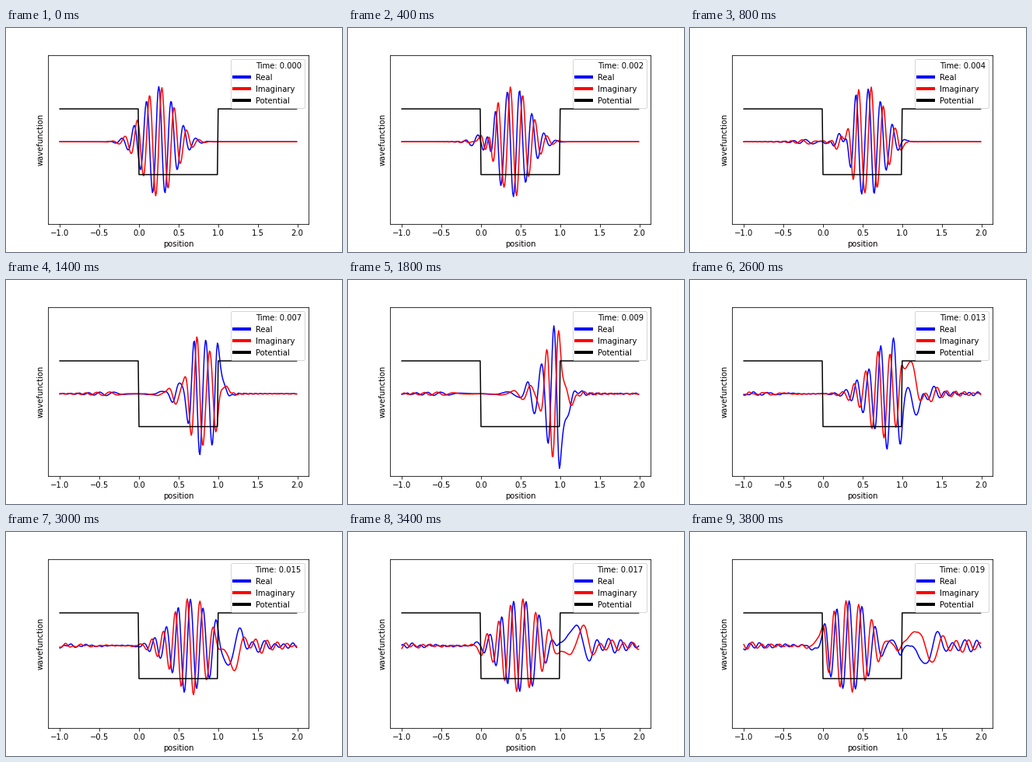
These frames come from a looping animation (432x288 px, 4 s). A matplotlib script:

```python
import numpy as np
import matplotlib.pyplot as plt
from matplotlib.animation import FuncAnimation
from matplotlib.lines import Line2D

FRAMES, INTERVAL = 20, 200
DX, DT, SUBSTEPS = 0.01, 0.001, 100
K0, X0, SIGMA = 40, 0.25, 0.2
WALL = 2000

x = np.round(np.arange(300) * DX - 1, 6)
k = 2 * np.pi * np.fft.fftfreq(x.size, DX)


def evolve():
    """Split-step solution of i psi_t = -psi_xx + V psi, one state per DT."""
    v = WALL * (np.heaviside(-x, 0.5) + np.heaviside(x - 1, 0.5))
    tau = DT / SUBSTEPS
    half_kick = np.exp(-0.5j * v * tau)
    drift = np.exp(-1j * k**2 * tau)

    psi = np.exp(-(x - X0)**2 / (2 * SIGMA**2) + 1j * K0 * (x - X0))
    psi /= np.sqrt(np.sum(np.abs(psi)**2) * DX)
    states = [psi]
    for _ in range(FRAMES - 1):
        for _ in range(SUBSTEPS):
            psi = half_kick * np.fft.ifft(drift * np.fft.fft(half_kick * psi))
        states.append(psi)
    return states


states = evolve()
well = np.where((x >= 0) & (x < 1), -1, 1)

plt.rcParams.update({"font.family": "DejaVu Sans", "font.size": 10})
fig, ax = plt.subplots(figsize=(6, 4), dpi=72)
fig.subplots_adjust(left=0.125, right=0.9, bottom=0.125, top=0.88)

real, = ax.plot(x, states[0].real, color="blue", lw=1.5)
imag, = ax.plot(x, states[0].imag, color="red", lw=1.5)
ax.plot(x, well, color="black", lw=1.5)

ax.set_ylim(-2.503, 2.6435)
ax.set_yticks([])
ax.set_xlabel("position")
ax.set_ylabel("wavefunction")

keys = [Line2D([0], [0], color=c, lw=4) for c in ("white", "blue", "red", "black")]
legend = ax.legend(keys, ["Time: 0.000", "Real", "Imaginary", "Potential"],
                   loc="upper right")
clock = legend.get_texts()[0]


def update(i):
    real.set_ydata(states[i].real)
    imag.set_ydata(states[i].imag)
    clock.set_text(f"Time: {i * DT:.3f}")
    return real, imag, clock


anim = FuncAnimation(fig, update, frames=FRAMES, interval=INTERVAL,
                     repeat=True, repeat_delay=0)
plt.show()
```
